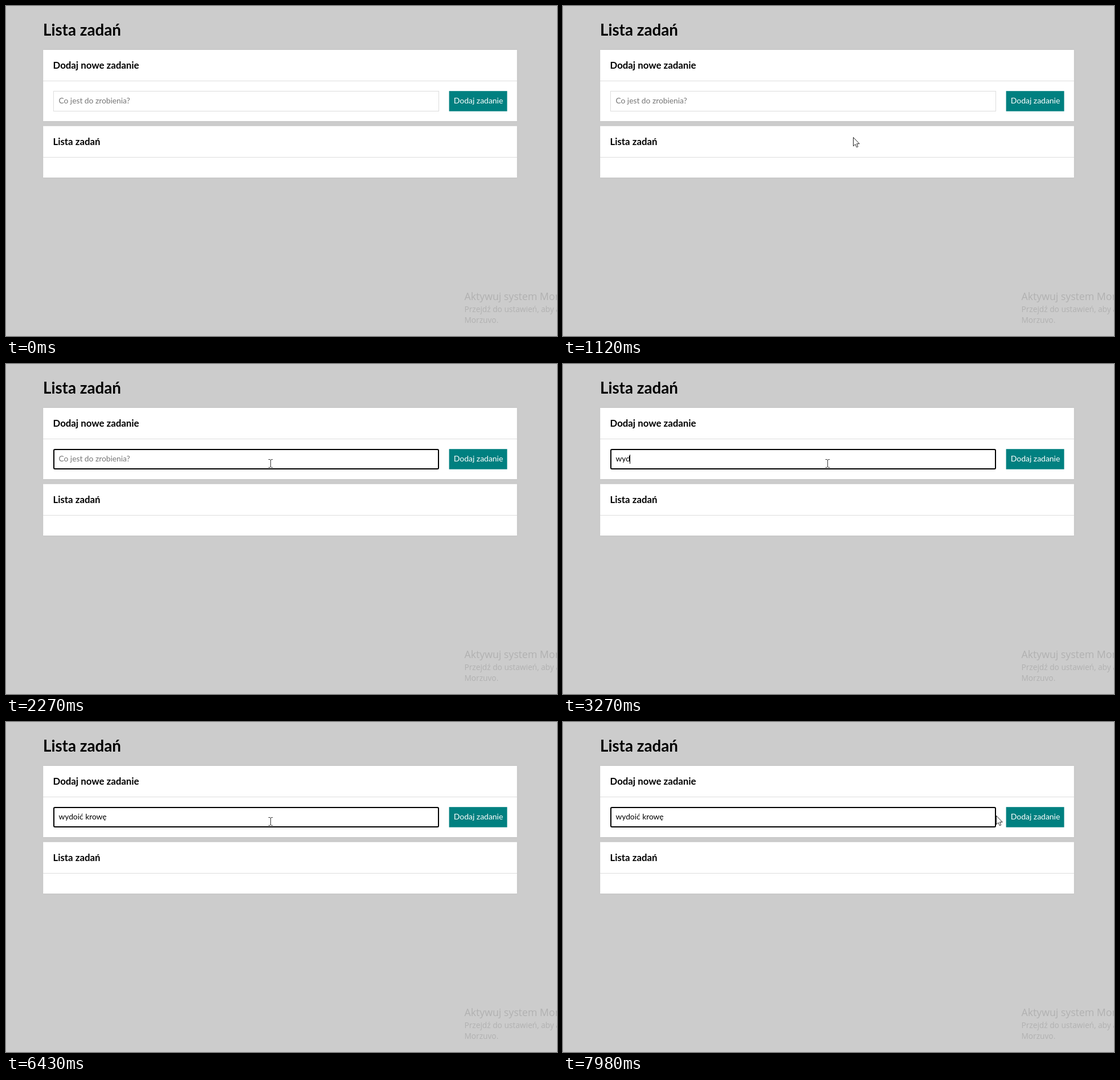
Write an HTML page that moves like this. It is 967 px wide and 579 px high and loops after 8 s.

```html
<!DOCTYPE html>
<html lang="pl">
<head>
<meta charset="utf-8">
<title>Lista zadań</title>
<style>
  html, body { margin: 0; width: 100%; height: 100%; overflow: hidden; background: #ccc; }
  svg { display: block; }
  text { font: 13.8px Lato, sans-serif; white-space: pre; }
  .card { fill: #fff; filter: drop-shadow(0 0 1px #bbb); }
  .line { fill: #ddd; }
  .title { font-size: 27.7px; font-weight: 700; }
  .heading { font-size: 16.8px; font-weight: 700; }
  .button { font-size: 13.95px; fill: #fff; }
  .notice text { font: 13.7px "Open Sans", sans-serif; fill: #b1b1b1; }
  .notice .big { font-size: 17.7px; }
</style>
</head>
<body>
<svg width="967" height="579" viewBox="0 0 967 579">
  <text class="title" x="65" y="52">Lista zadań</text>

  <rect class="card" x="65.2" y="77" width="831.6" height="125"/>
  <rect class="line" x="65" y="131" width="832" height="1"/>
  <text class="heading" x="82.5" y="110">Dodaj nowe zadanie</text>
  <rect x="83.5" y="149.5" width="676" height="35" fill="#fff" stroke="#ddd"/>
  <rect x="777.6" y="149.2" width="101.9" height="35.5" fill="teal"/>
  <text class="button" x="785.8" y="171">Dodaj zadanie</text>

  <rect class="card" x="65.2" y="210.6" width="831.6" height="90.4"/>
  <rect class="line" x="65" y="265" width="832" height="1"/>
  <text class="heading" x="82.5" y="244">Lista zadań</text>

  <g class="notice">
    <text class="big" x="804.5" y="516">Aktywuj system Morzuvo</text>
    <text x="804.5" y="537">Przejdź do ustawień, aby aktywować system</text>
    <text x="804.5" y="556">Morzuvo.</text>
  </g>

  <rect id="focusRing" x="84" y="150" width="675" height="34" rx="2" fill="none" stroke="#000" stroke-width="2"/>
  <text id="placeholder" x="92.4" y="171" fill="#757575">Co jest do zrobienia?</text>
  <text id="typed" x="92.4" y="171"></text>
  <rect id="caret" y="159" width="1" height="16"/>

  <circle id="click" cx="461.7" cy="173.3" r="11.2" fill="#ffff80"/>
  <path id="arrow" d="M.5 .5V15.8L4 12.6L6.3 17.8L8.7 16.8L6.5 11.7H11.2Z" fill="#fff" stroke="#222"/>
  <path id="beam" d="M-3.5 -6.5H-1L.5 -5.5L2 -6.5H4M.5 -5.5V6.5M-3.5 7.5H-1L.5 6.5L2 7.5H4" fill="none" stroke="#333"/>
</svg>
<script>
const LOOP = 8000, STEP = 70, BLINK = 530;
const CLICK = 1730, FOCUS = 1805, RELEASE = 1870;

// Each word is typed at its own pace; accented letters take twice as long.
const WORDS = [
  { text: "wydoić", start: 2690, pace: 285 },
  { text: " krowę", start: 4610, pace: 215 },
];

const ENTRY = [888, 566], TURN = [578, 314], FIELD = [464, 174], EXIT = [760, 164];

// Straight moves with an ease-out power and a sideways bend.
const MOVES = [
  { start: 70, end: 840, from: ENTRY, to: TURN, power: 1, bend: [35, 0] },
  { start: 840, end: 1600, from: TURN, to: FIELD, power: 2, bend: [0, 0] },
  { start: 7090, end: 7980, from: FIELD, to: EXIT, power: 1.25, bend: [0, -11] },
];

const [focusRing, placeholder, typed, caret, click, arrow, beam] =
  ["focusRing", "placeholder", "typed", "caret", "click", "arrow", "beam"]
    .map(id => document.getElementById(id));

const show = (el, on) => el.setAttribute("visibility", on ? "visible" : "hidden");

function typingAt(t) {
  let text = "", lastKey = CLICK;
  for (const word of WORDS) {
    let time = word.start;
    [...word.text].forEach((letter, i) => {
      if (i) time += word.pace * ("ćę".includes(letter) ? 2 : 1);
      if (time > t) return;
      text += letter;
      lastKey = time;
    });
  }
  return { text, lastKey };
}

function pointerAt(t) {
  const move = MOVES.findLast(m => m.start <= t) || MOVES[0];
  const k = Math.min(1, Math.max(0, (t - move.start) / (move.end - move.start)));
  const eased = 1 - (1 - k) ** move.power;
  return move.from.map((from, axis) => Math.round(
    from + (move.to[axis] - from) * eased + move.bend[axis] * Math.sin(Math.PI * k)));
}

function drawField(t) {
  const { text, lastKey } = typingAt(t);
  const focused = t >= FOCUS;
  typed.textContent = text;
  show(placeholder, !text);
  show(focusRing, focused);
  show(caret, focused && (t - lastKey) % (2 * BLINK) < BLINK);
  caret.setAttribute("x", Math.floor(92.4 + (text && typed.getComputedTextLength())));
}

function drawPointer(t) {
  const [x, y] = pointerAt(Math.floor(t / STEP) * STEP);
  const overField = x > 83 && x < 760 && y > 149 && y < 185;
  for (const el of [arrow, beam]) el.setAttribute("transform", `translate(${x} ${y})`);
  show(arrow, t >= STEP && !overField);
  show(beam, overField);
  show(click, t >= CLICK && t < RELEASE);
}

const origin = performance.now();

function frame() {
  const t = (performance.now() - origin) % LOOP;
  drawField(t);
  drawPointer(t);
  requestAnimationFrame(frame);
}
frame();
</script>
</body>
</html>
```
